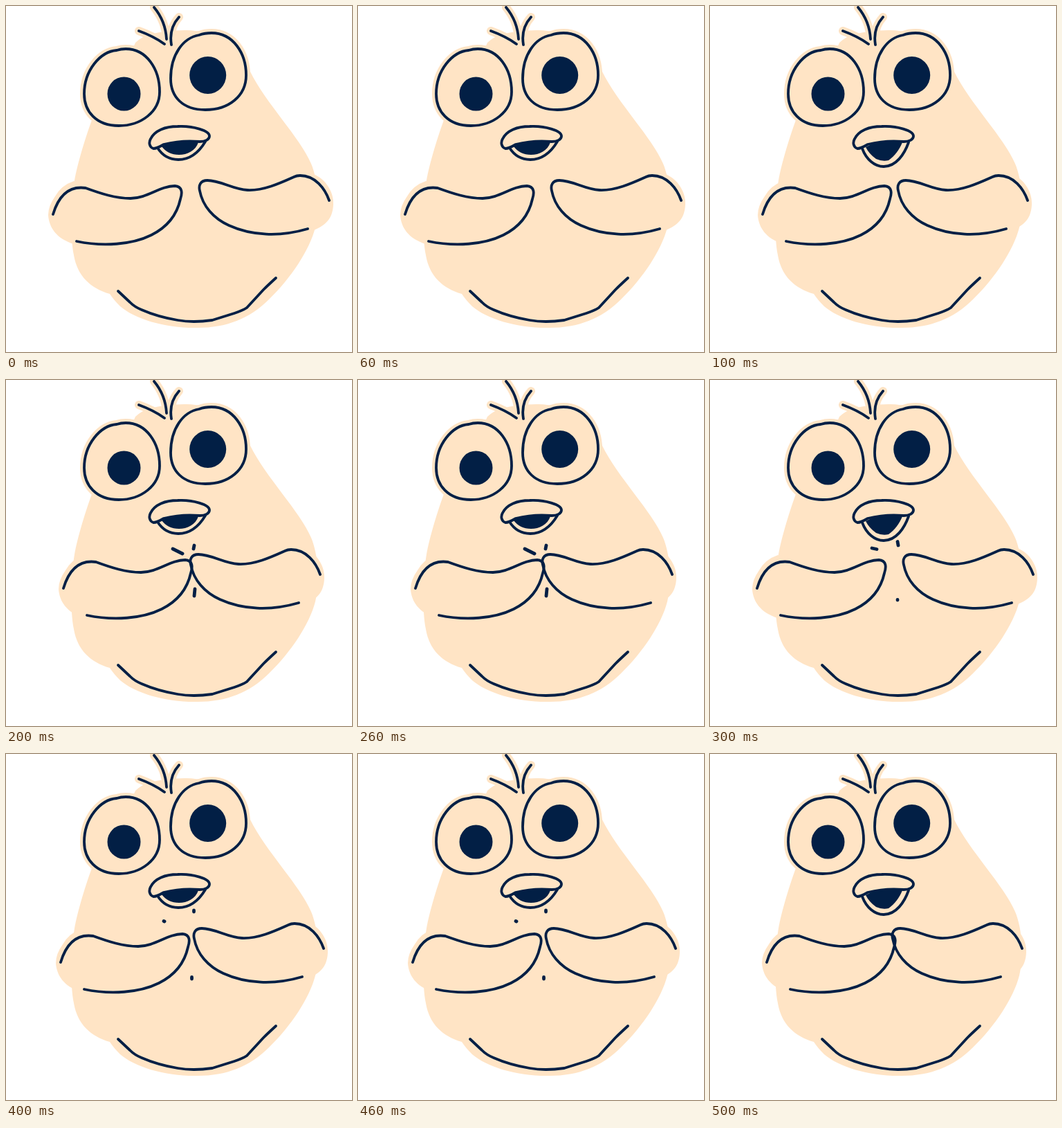
Animation of 500 by 500 pixels, one loop 600 ms. Source, as an HTML page:

```html
<!DOCTYPE html>
<html lang="en">
<head>
<meta charset="utf-8">
<title>Clapping bird</title>
<style>
  html, body { margin: 0; width: 100%; height: 100%; overflow: hidden; background: #fff; }
  svg { display: block; width: 100%; height: 100%; }
  .skin { fill: #ffe4c5; }
  .halo { fill: #ffe4c5; stroke: #ffe4c5; stroke-width: 12; stroke-linecap: round; stroke-linejoin: round; }
  .line { fill: none; stroke: #021f45; stroke-width: 3.8; stroke-linecap: round; stroke-linejoin: round; }
  .spark { stroke-width: 4.8; }
  .dark { fill: #021f45; }
</style>
</head>
<body>
<svg viewBox="0 0 500 500">
  <defs>
    <path id="hair" d="M214 2C224 14 231 30 232 48M250 16C241 26 236 38 239 56M192 36Q214 44 229 55"/>
    <g id="eyes">
      <path d="M173 62C203 62 222 91 222 124C222 153 195 173 163 173C130 173 113 152 113 127C113 93 136 66 160 64Q166 62 173 62Z"/>
      <path d="M297 39C328 39 347 68 347 100C347 130 322 150 288 150C255 150 238 131 238 105C238 70 256 46 279 42Q287 39 297 39Z"/>
    </g>
  </defs>

  <path class="skin" d="M182 64L187 53Q195 45 208 41Q230 35 258 35C300 34 340 60 353 95C375 140 425 190 441 228C452 254 453 295 447 320C439 352 412 393 380 424C352 452 318 465 277 465C232 466 187 453 165 434Q155 424 150 416C122 408 103 390 98 360C93 335 93 288 99 252C103 230 113 195 124 165Z"/>
  <use href="#hair" class="halo" style="fill:none"/>
  <use href="#eyes" class="halo"/>

  <g class="left"><path class="skin" d="M140 262L115 257L98 253Q80 259 71 275Q61 289 61 302C62 319 72 336 98 344L140 340Z"/></g>
  <g class="right"><path class="skin" d="M400 250L425 240Q441 239 452 247C466 256 474 273 473 287C472 305 465 315 447 323L436 327L400 325Z"/></g>

  <use href="#hair" class="line"/>
  <use href="#eyes" class="line"/>
  <ellipse class="dark" cx="170.5" cy="127" rx="24" ry="24.5"/>
  <ellipse class="dark" cx="291.7" cy="100" rx="26.5" ry="27"/>
  <path class="line" d="M162 412L179 428Q186 435 196 439C212 446 230 451 248 454Q270 458 298 454L330 444Q342 440 348 436L372 410Q378 404 390 393"/>

  <g id="narrow">
    <path class="dark" d="M225 203C240 195 260 194 278 197C274 209 262 215 250 215C239 215 231 211 225 203Z"/>
    <path class="line" d="M219 205C226 216 236 222 249 222C266 222 279 211 288 196"/>
  </g>
  <g id="wide">
    <path class="dark" d="M225 204C240 195 260 194 278 197C274 207 267 217 258 223Q249 225 240 221Q230 214 225 204Z"/>
    <path class="line" d="M220 206C226 222 238 232 251 232C269 232 281 214 287 197"/>
  </g>
  <path class="line" d="M213 206C207 204 206 197 209 192C215 180 230 174 248 174C270 173 294 180 294 188C294 193 288 196 280 196C260 194 240 197 228 200Q218 206 213 206Z"/>

  <g class="left"><path class="line" d="M68 301C74 281 86 259 115 263C137 271 158 278 180 278C204 278 222 260 244 260C255 261 255 270 252 279C247 302 232 320 210 331C182 345 140 348 102 340"/></g>
  <g class="right"><path class="line" d="M467 281C461 264 447 245 425 245Q420 245 416 247C396 256 372 267 349 266C328 265 310 252 291 252C281 252 278 259 280 267C284 289 300 307 322 317C355 332 395 334 436 322"/></g>

  <path id="spark0" class="line spark" d="M241 244L255 251M272 239L271 244M273 302L272 312"/>
  <path id="spark1" class="line spark" d="M234 243L241 244.5M271 233.5L272 239M271 317.5V318"/>
  <path id="spark2" class="line spark" d="M228 241.5L229 242M271.5 226V228M268.5 322.5V325"/>
</svg>
<script>
  const STEP = 100;

  // Hold each value for one step, then jump to the next.
  function hold(selector, prop, values, format = String) {
    const frames = [...values, values[values.length - 1]].map((v, i) => ({
      [prop]: format(v),
      offset: i / values.length,
      easing: 'steps(1, end)'
    }));
    for (const el of document.querySelectorAll(selector)) {
      const anim = el.animate(frames, { duration: STEP * values.length, iterations: Infinity });
      anim.startTime = document.timeline.currentTime;
    }
  }

  const shift = x => `translate(${x}px, 0px)`;

  hold('.left', 'transform', [0, 8, 15, 0, 11, 14], shift);
  hold('.right', 'transform', [0, -8, -13, 0, -8, -16], shift);
  hold('#narrow', 'opacity', [1, 0, 1, 0, 1, 0]);
  hold('#wide', 'opacity', [0, 1, 0, 1, 0, 1]);
  hold('#spark0', 'opacity', [0, 0, 1, 0, 0, 0]);
  hold('#spark1', 'opacity', [0, 0, 0, 1, 0, 0]);
  hold('#spark2', 'opacity', [0, 0, 0, 0, 1, 0]);
</script>
</body>
</html>
```
